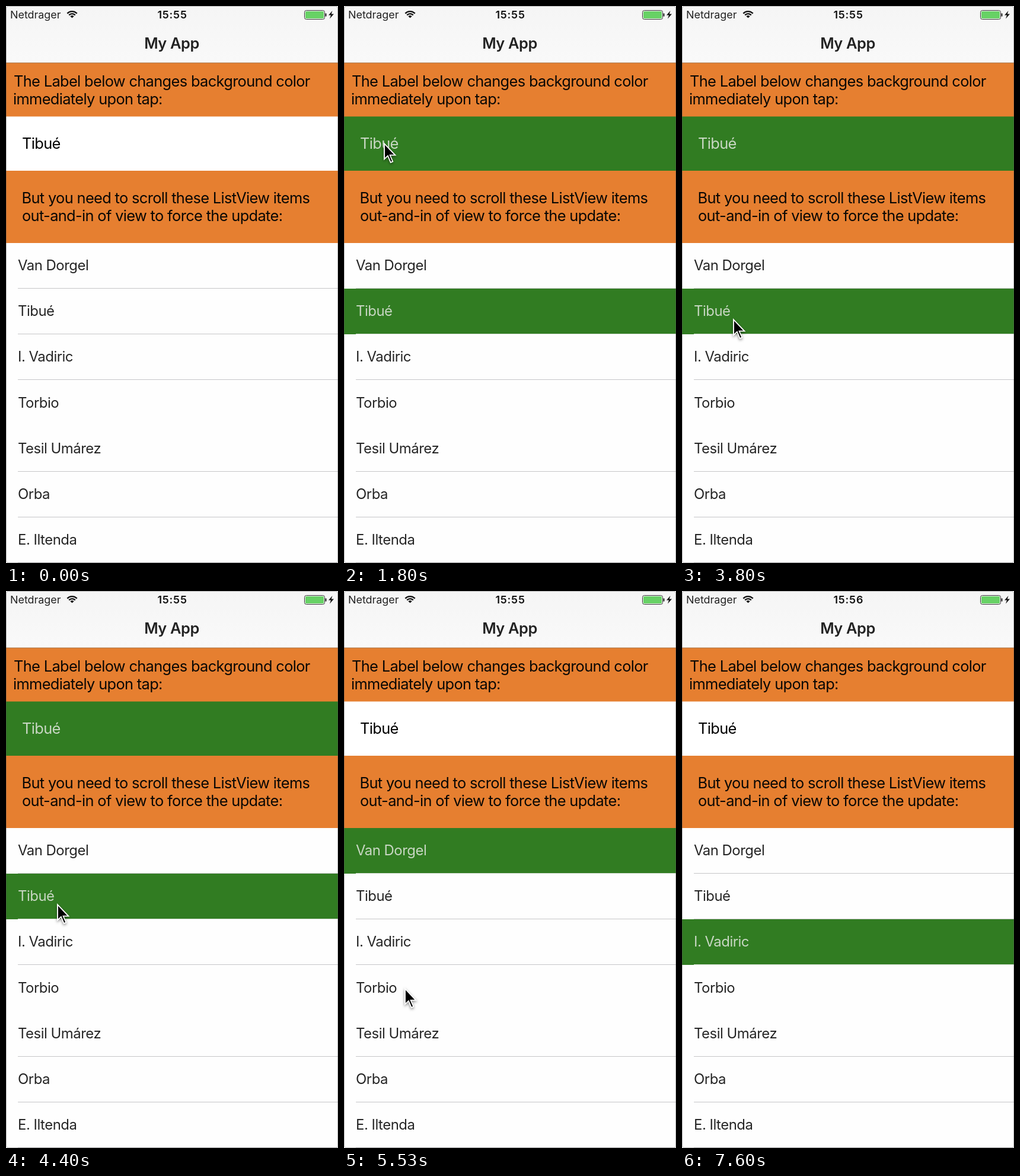
Animation, 560 px wide and 940 px high, one loop 7670 ms. Source, as an HTML page with a canvas:

```html
<!DOCTYPE html>
<html lang="en">
<head>
<meta charset="utf-8">
<title>My App</title>
<style>
  html, body { margin: 0; width: 100%; height: 100%; overflow: hidden; background: #fff; }
  canvas { display: block; width: 560px; height: 940px; }
</style>
</head>
<body>
<canvas id="stage" width="560" height="940"></canvas>
<script>
const ctx = document.getElementById('stage').getContext('2d');
const W = 560, H = 940, LOOP = 7670, STEP = LOOP / 115;
const ORANGE = '#e67f30', GREEN = '#317c22', PALE = '#c8d7c3';
const FONT = 'Inter, Roboto, sans-serif';
const ROW_TOP = 399.6, ROW_H = 77.2;
const players = ['Van Dorgel', 'Tibué', 'I. Vadiric', 'Torbio', 'Tesil Umárez', 'Orba', 'E. Iltenda'];
const LABEL_PLAYER = 1;

// [time, selected row]
const taps = [[0, -1], [1700, 1], [2700, 0], [3700, 1], [4850, 0], [5680, 3], [6550, 2]];
const CLOCK_TICK = 5870;

// [time, x, y] of the pointer tip
const path = [
  [900, 110, -40], [1500, 67, 231], [1950, 67, 231], [2500, 88, 453], [3000, 88, 453],
  [3500, 86, 528], [4420, 86, 528], [4750, 88, 450], [4950, 88, 450], [5450, 102, 670],
  [5700, 102, 670], [6100, 108, 597], [6700, 108, 597], [7150, -40, 585]
];

function rect(color, x, y, w, h) {
  ctx.fillStyle = color;
  ctx.fillRect(x, y, w, h);
}

function text(str, x, y, { size = 25.4, weight = 400, color = '#0a0805', gap = -0.65, align = 'left' } = {}) {
  ctx.font = `${weight} ${size}px ${FONT}`;
  ctx.letterSpacing = gap + 'px';
  ctx.textAlign = align;
  ctx.fillStyle = color;
  ctx.fillText(str, x, y);
}

function polygon(points) {
  ctx.beginPath();
  points.forEach(([x, y]) => ctx.lineTo(x, y));
  ctx.closePath();
}

function wifi(x, y) {
  ctx.strokeStyle = '#111';
  ctx.lineWidth = 2.3;
  for (const r of [7.2, 11.2]) {
    ctx.beginPath();
    ctx.arc(x, y, r, -Math.PI * 0.76, -Math.PI * 0.24);
    ctx.stroke();
  }
  ctx.fillStyle = '#111';
  ctx.beginPath();
  ctx.moveTo(x, y);
  ctx.arc(x, y, 4.2, -Math.PI * 0.76, -Math.PI * 0.24);
  ctx.fill();
}

function battery() {
  ctx.strokeStyle = '#333';
  ctx.lineWidth = 1;
  ctx.beginPath();
  ctx.roundRect(503.5, 7.5, 34, 15, 3);
  ctx.stroke();
  ctx.fillStyle = '#67d165';
  ctx.beginPath();
  ctx.roundRect(505, 9, 31, 12, 1.5);
  ctx.fill();
  rect('#222', 538.5, 12.5, 2, 5);
  ctx.fillStyle = '#111';
  polygon([[550.5, 8], [544, 15.6], [548, 15.6], [546, 21.5], [553, 13.4], [548.8, 13.4]]);
  ctx.fill();
}

function header(t) {
  const shade = ctx.createLinearGradient(0, 0, 0, 96);
  shade.addColorStop(0, '#f5f5f5');
  shade.addColorStop(1, '#f9f9f9');
  rect(shade, 0, 0, W, 96);
  text('Netdrager', 7, 21, { size: 17.9, gap: 0, color: '#222' });
  wifi(111.5, 20.3);
  const time = t < CLOCK_TICK ? '15:55' : '15:56';
  text(time, 255.5, 21, { size: 17.9, weight: 600, gap: 0.8, color: '#111' });
  battery();
  text('My App', 279.5, 72, { weight: 600, gap: -0.4, color: '#222', align: 'center' });
}

function labels(selected) {
  rect(ORANGE, 0, 96, W, 91);
  rect('#a8703f', 0, 95.5, W, 1);
  text('The Label below changes background color', 13, 136);
  text('immediately upon tap:', 12, 166);

  const on = selected === LABEL_PLAYER;
  rect(on ? GREEN : '#fff', 0, 186.5, W, 91.5);
  text(players[LABEL_PLAYER], 27, 241, { color: on ? PALE : '#000' });

  rect(ORANGE, 0, 278, W, 122);
  text('But you need to scroll these ListView items', 26.5, 333);
  text('out-and-in of view to force the update:', 27, 363);
}

function list(selected) {
  players.forEach((name, i) => {
    const top = Math.round(ROW_TOP + i * ROW_H);
    const bottom = Math.round(ROW_TOP + (i + 1) * ROW_H);
    const on = i === selected;
    if (on) rect(GREEN, 0, top, W, bottom - top);
    if (i !== 3) rect(on ? '#d3ddd1' : '#c6c6c8', 20, bottom - 1, W - 20, 1);
    text(name, 20, 446 + i * ROW_H, { size: 23.9, gap: -0.48, color: on ? PALE : '#252525' });
  });
}

function frame() {
  ctx.strokeStyle = 'rgba(90, 90, 90, 0.42)';
  ctx.lineWidth = 1;
  ctx.beginPath();
  ctx.roundRect(0.5, 0.5, W - 1, H - 1, 3);
  ctx.stroke();
}

function pointerAt(t) {
  const i = path.findIndex(p => p[0] > t);
  if (i < 1) return null;
  const [t0, x0, y0] = path[i - 1], [t1, x1, y1] = path[i];
  const u = (t - t0) / (t1 - t0), e = u * u * (3 - 2 * u);
  return [x0 + (x1 - x0) * e, y0 + (y1 - y0) * e];
}

function pointer(x, y) {
  ctx.save();
  ctx.translate(x, y);
  polygon([[0, -1], [0, 29.5], [6.6, 23.3], [11.2, 34.3], [16.4, 32], [11.8, 21.6], [21.5, 21.6]]);
  ctx.shadowColor = 'rgba(0, 0, 0, 0.45)';
  ctx.shadowBlur = 4;
  ctx.shadowOffsetY = 2;
  ctx.fillStyle = '#fff';
  ctx.fill();
  ctx.shadowColor = 'transparent';
  polygon([[1.9, 3.4], [1.9, 25.3], [7.2, 20.3], [12.1, 31.8], [14.1, 30.9], [9.2, 19.7], [17.2, 19.7]]);
  ctx.fillStyle = '#000';
  ctx.fill();
  ctx.restore();
}

function draw(t) {
  let selected = -1;
  for (const [at, row] of taps) if (t >= at) selected = row;
  rect('#fefefe', 0, 0, W, H);
  header(t);
  labels(selected);
  list(selected);
  frame();
  const tip = pointerAt(t);
  if (tip) pointer(...tip);
}

const start = performance.now();
function tick(now) {
  const t = Math.max(0, now - start) % LOOP;
  draw(Math.floor(t / STEP) * STEP);
  requestAnimationFrame(tick);
}
draw(0);
requestAnimationFrame(tick);
</script>
</body>
</html>
```
